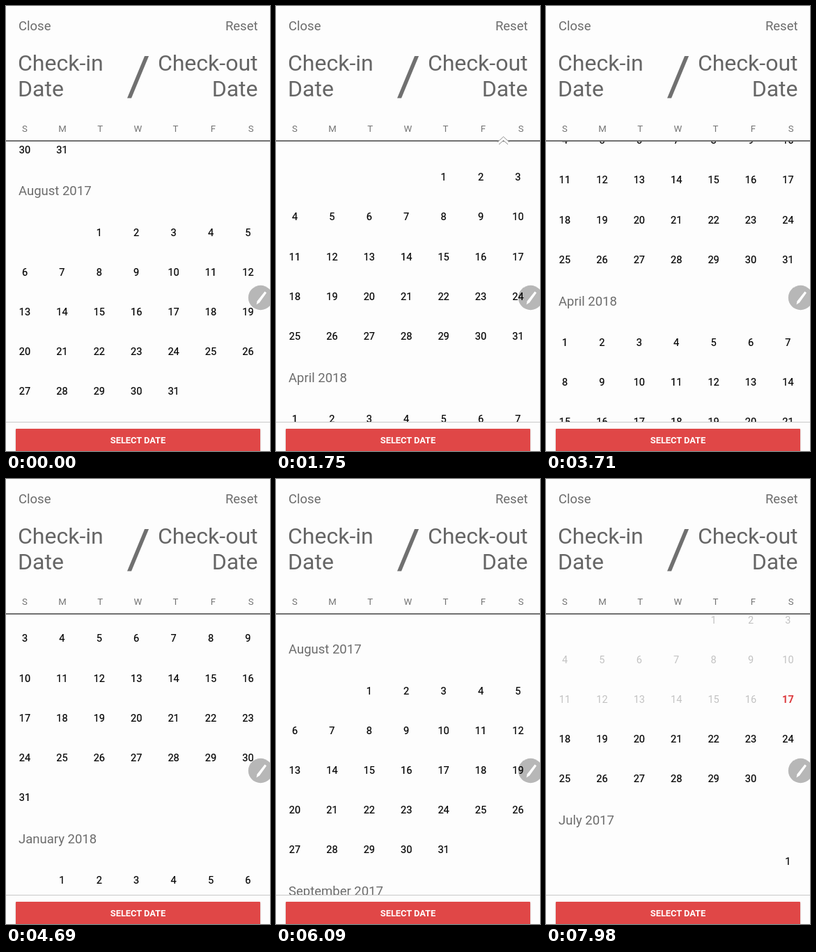
Recreate the animation shown at these times as an HTML page. Size 379 by 640 pixels, loop 8 s.

```html
<!DOCTYPE html>
<html lang="en">
<head>
<meta charset="utf-8">
<title>Date picker</title>
<style>
  html, body { margin: 0; width: 100%; height: 100%; overflow: hidden; background: #fdfdfd; }
  svg { display: block; width: 100vw; height: 100vh; font-family: Roboto, sans-serif; }
  .grey { fill: #707070; }
  .title { font-size: 32px; fill: #666; }
  .label { font-size: 18.5px; fill: #6c6c6c; }
  .week { font-size: 13.2px; fill: #737373; text-anchor: middle; }
  .day { font-size: 14.5px; fill: #000; stroke: #000; stroke-width: .2px; text-anchor: middle; }
  .past { fill: #c2c2c2; stroke: none; }
  .today { fill: #dc3a3e; stroke: none; font-weight: 700; }
  .right { text-anchor: end; }
</style>
</head>
<body>
<svg viewBox="0 0 379 640">
  <defs>
    <clipPath id="view"><rect y="194" width="379" height="404"/></clipPath>
    <filter id="shadow" x="-5%" y="-30%" width="110%" height="160%">
      <feDropShadow dx="0" dy="1" stdDeviation="1" flood-color="#000" flood-opacity=".25"/>
    </filter>
  </defs>
  <rect width="379" height="640" fill="#fdfdfd"/>
  <g clip-path="url(#view)"><g id="list"></g></g>

  <text class="label" x="18" y="35">Close</text>
  <text class="label right" x="361.5" y="35">Reset</text>
  <g class="title">
    <text x="17" y="93">Check-in</text>
    <text x="17" y="130">Date</text>
    <text class="right" x="361.5" y="93">Check-out</text>
    <text class="right" x="361.5" y="130">Date</text>
  </g>
  <path class="grey" d="M199 72H205L180 132.5H174Z"/>
  <g id="week"></g>
  <rect class="grey" y="193" width="379" height="2"/>

  <rect y="598" width="379" height="42" fill="#fdfdfd"/>
  <rect y="598" width="379" height="1" fill="#c8c8c8"/>
  <rect x="14" y="608" width="351" height="36" rx="1" fill="#e04646" filter="url(#shadow)"/>
  <text x="189.5" y="629.3" font-size="12.8" font-weight="700" fill="#fff" text-anchor="middle">SELECT DATE</text>

  <circle cx="365.5" cy="419.5" r="17.7" fill="#000" opacity=".28"/>
  <path d="M371.5 410.5L374 412.5L364 426.5L359.5 429.5L360.5 424.5Z" fill="#fff"/>

  <circle id="dot" cx="228.5" cy="494.5" r="1.8" fill="#fff" stroke="#b0b0b0" stroke-width=".9"/>
  <g id="arrow" fill="none">
    <path d="M319 197L326.5 190.5L334 197" stroke="#fff" stroke-width="4"/>
    <path d="M318 196L326.5 188L335 196M320 199L326.5 193.5L333 199" stroke="#8c8c8c"/>
  </g>
</svg>
<script>
const LOOP = 8000, STEP = 70;
const ROW = 57.2, HEAD = 59.5;
const TODAY = new Date(2017, 5, 17);
const TOP = -226, BOTTOM = 4007;
const byId = id => document.getElementById(id);
const list = byId('list');

function addText(parent, x, y, cls, str) {
  const el = document.createElementNS('http://www.w3.org/2000/svg', 'text');
  el.setAttribute('x', x);
  el.setAttribute('y', y);
  el.setAttribute('class', cls);
  el.textContent = str;
  parent.append(el);
}

function dayClass(date) {
  if (date < TODAY) return 'day past';
  return +date === +TODAY ? 'day today' : 'day';
}

// Adds one month with its heading centred on y; returns the next heading's y.
function addMonth(index, y) {
  const first = new Date(2017, index, 1);
  const name = first.toLocaleString('en-US', { month: 'long' });
  const count = new Date(2017, index + 1, 0).getDate();
  const offset = first.getDay();
  addText(list, 18, y + 6.5, 'label', `${name} ${first.getFullYear()}`);
  for (let d = 1; d <= count; d++) {
    const cell = offset + d - 1;
    const cy = y + HEAD + Math.floor(cell / 7) * ROW;
    addText(list, 27 + (cell % 7) * 53.4, cy + 5.2, dayClass(new Date(2017, index, d)), d);
  }
  return y + 2 * HEAD + (Math.ceil((offset + count) / 7) - 1) * ROW;
}

[...'SMTWTFS'].forEach((c, i) => addText(byId('week'), 27 + i * 54.1, 181, 'week', c));
for (let m = 5, y = 0; m <= 17; m++) y = addMonth(m, y);

// Each swipe: start time, scroll offset there, share of the fling done before the next swipe.
const swipes = [
  [0, 487], [490, 998], [1120, 1760], [1610, 2573], [2310, BOTTOM],
  [2800, BOTTOM], [3290, 3640], [3850, 3129, 0.64], [4620, 2167], [5110, 1621],
  [5600, 1037], [6230, 473], [6930, TOP], [7840, TOP, 0.1], [LOOP, -131.5]
];

const fling = p => 1 - (1 - p) ** 1.85;

function scrollAt(t) {
  const i = swipes.findIndex(s => s[0] > t);
  const [t0, from, share = 1] = swipes[i - 1];
  const [t1, to] = swipes[i];
  const p = (t - t0) / (t1 - t0);
  return from + (to - from) * fling(p * share) / fling(share);
}

const showBetween = (id, t, from, to) => {
  byId(id).style.display = t >= from && t <= to ? '' : 'none';
};

function draw(time) {
  const t = Math.floor((time % LOOP) / STEP) * STEP;
  list.setAttribute('transform', `translate(0 ${-scrollAt(t)})`);
  showBetween('dot', t, 490, 560);
  showBetween('arrow', t, 1680, 1820);
}

const start = performance.now();
function tick() {
  draw(performance.now() - start);
  requestAnimationFrame(tick);
}
tick();
</script>
</body>
</html>
```
